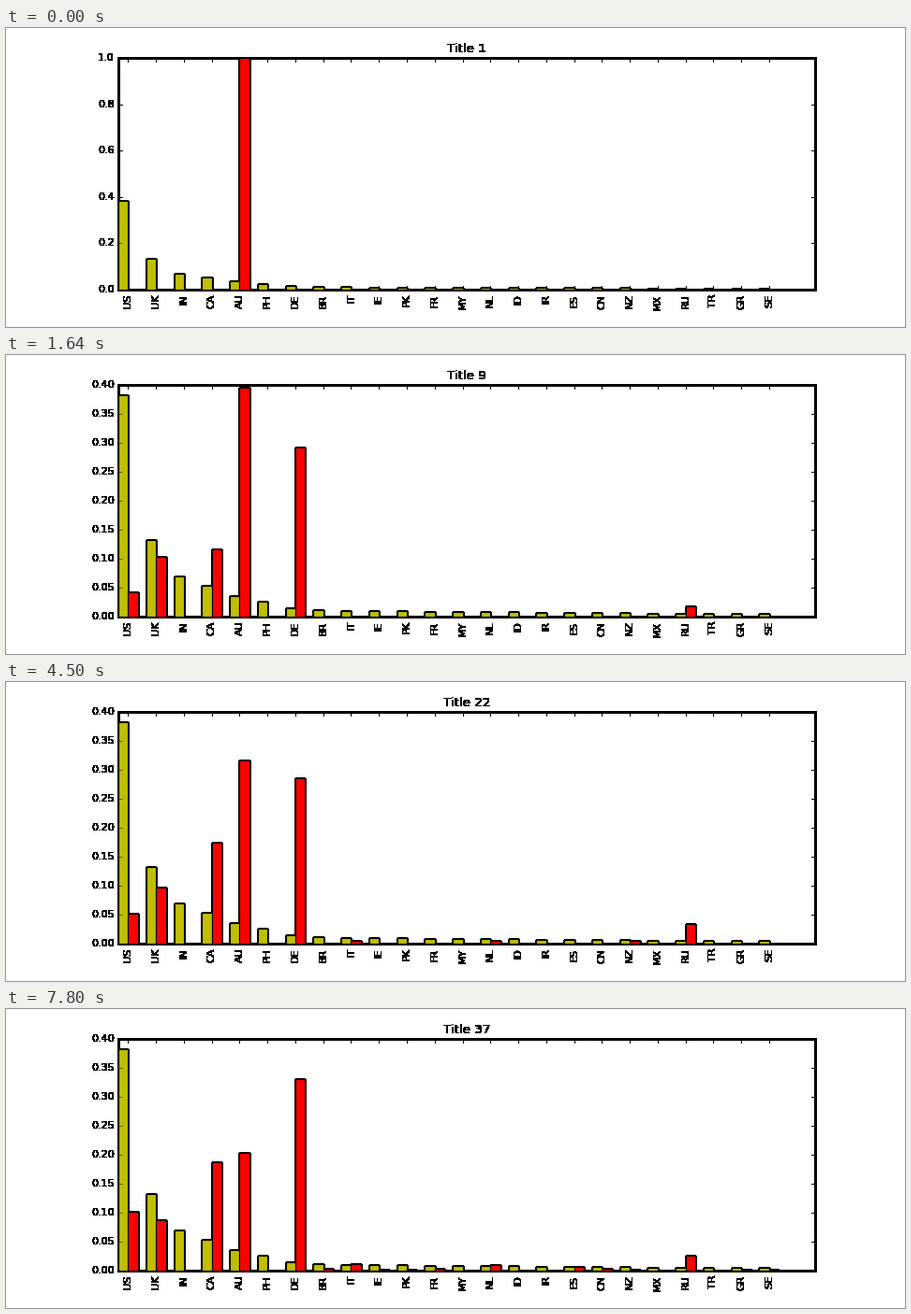
Animation, 960 px wide and 320 px high, one loop 8000 ms. Source, as a matplotlib script:

```python
import numpy as np
import matplotlib.pyplot as plt
from matplotlib.animation import FuncAnimation
from matplotlib.ticker import MultipleLocator

plt.style.use("classic")
plt.rcParams.update({
    "font.family": "DejaVu Sans",
    "font.size": 10,
    "axes.titlesize": 12,
    "figure.facecolor": "white",
    "savefig.facecolor": "white",
    "savefig.dpi": "figure",
})

LOOP, INTERVAL = 8000, 40
FIRST_HOLD, HOLD = 100, 220
LAST_STEP = 37
BAR = 0.35

CODES = ("US UK IN CA AU PH DE BR IT IE PK FR MY NL "
         "ID IR ES CN NZ MX RU TR GR SE").split()
BASELINE = [.383, .133, .070, .054, .0355, .026, .0145, .0115,
            .0103, .0100, .0097, .0085, .0083, .0081, .0080, .0070,
            .0068, .0066, .0064, .0052, .0050, .0048, .0047, .0045]

# Running totals per country at a few steps; steps between are interpolated.
TOTALS = {
    1: dict(total=1, AU=1),
    6: dict(total=26, US=2, UK=2, CA=1, AU=10, DE=11),
    13: dict(total=98, US=3, UK=11, CA=14, AU=39, DE=24, IT=1, NZ=1, RU=3),
    18: dict(total=159, US=8, UK=19, CA=16, AU=56, DE=47,
             IT=1, NL=1, NZ=1, RU=7),
    26: dict(total=262, US=14, UK=22, CA=57, AU=77, DE=73,
             IT=2, NL=1, NZ=1, RU=7, GR=1, SE=1),
    33: dict(total=392, US=37, UK=33, CA=93, AU=102, DE=94, IT=3, IE=1, PK=1,
             FR=2, NL=3, ES=1, CN=2, NZ=1, RU=7, GR=1, SE=1),
    36: dict(total=527, US=54, UK=46, CA=99, AU=108, DE=172, BR=2, IT=6, IE=1,
             PK=1, FR=2, NL=5, ES=3, CN=2, NZ=1, RU=14, GR=1, SE=1),
    37: dict(total=530, US=54, UK=46, CA=99, AU=108, DE=175, BR=2, IT=6, IE=1,
             PK=1, FR=2, NL=5, ES=3, CN=2, NZ=1, RU=14, GR=1, SE=1),
}


def total_at(step, key):
    return np.interp(step, list(TOTALS), [row.get(key, 0) for row in TOTALS.values()])


def shares(step):
    counts = np.array([total_at(step, code) for code in CODES])
    counts[7:] = np.floor(counts[7:] + 1e-9)  # rare countries grow in whole units
    return counts / total_at(step, "total")


def y_scale(peak):
    tick = 0.05 if peak <= 0.45 else 0.1 if peak <= 0.9 else 0.2
    return tick, np.ceil(peak / tick - 1e-9) * tick


def solidify(image, dpi):
    """Make every partly covered pixel opaque, for hard-edged lines and text."""
    image[..., 3] = image[..., 3] > 0
    return image, 0, 0


fig = plt.figure(figsize=(12, 4), dpi=80)
ax = fig.add_axes([0.125, 0.125, 0.775, 0.775])
ax.patch.set_visible(False)
ax.set_agg_filter(solidify)

index = np.arange(len(CODES))
ax.bar(index, BASELINE, BAR, color="y", align="edge")
red_bars = ax.bar(index + BAR, shares(1), BAR, color="r", align="edge")
ax.set_xlim(0, 25)
ax.set_xticks(index + BAR)
ax.set_xticklabels(CODES, rotation="vertical")
title = ax.set_title("")


def update(frame):
    time = (frame + 0.5) * INTERVAL
    step = min(LAST_STEP, 2 + int((time - FIRST_HOLD) // HOLD))
    heights = shares(step)
    for bar, height in zip(red_bars, heights):
        bar.set_height(height)
    tick, top = y_scale(max(heights.max(), max(BASELINE)))
    ax.yaxis.set_major_locator(MultipleLocator(tick))
    ax.set_ylim(0, top)
    title.set_text(f"Title {step}")
    return [*red_bars, title]


animation = FuncAnimation(fig, update, frames=LOOP // INTERVAL,
                          interval=INTERVAL, repeat=True, repeat_delay=0)
plt.show()
```
